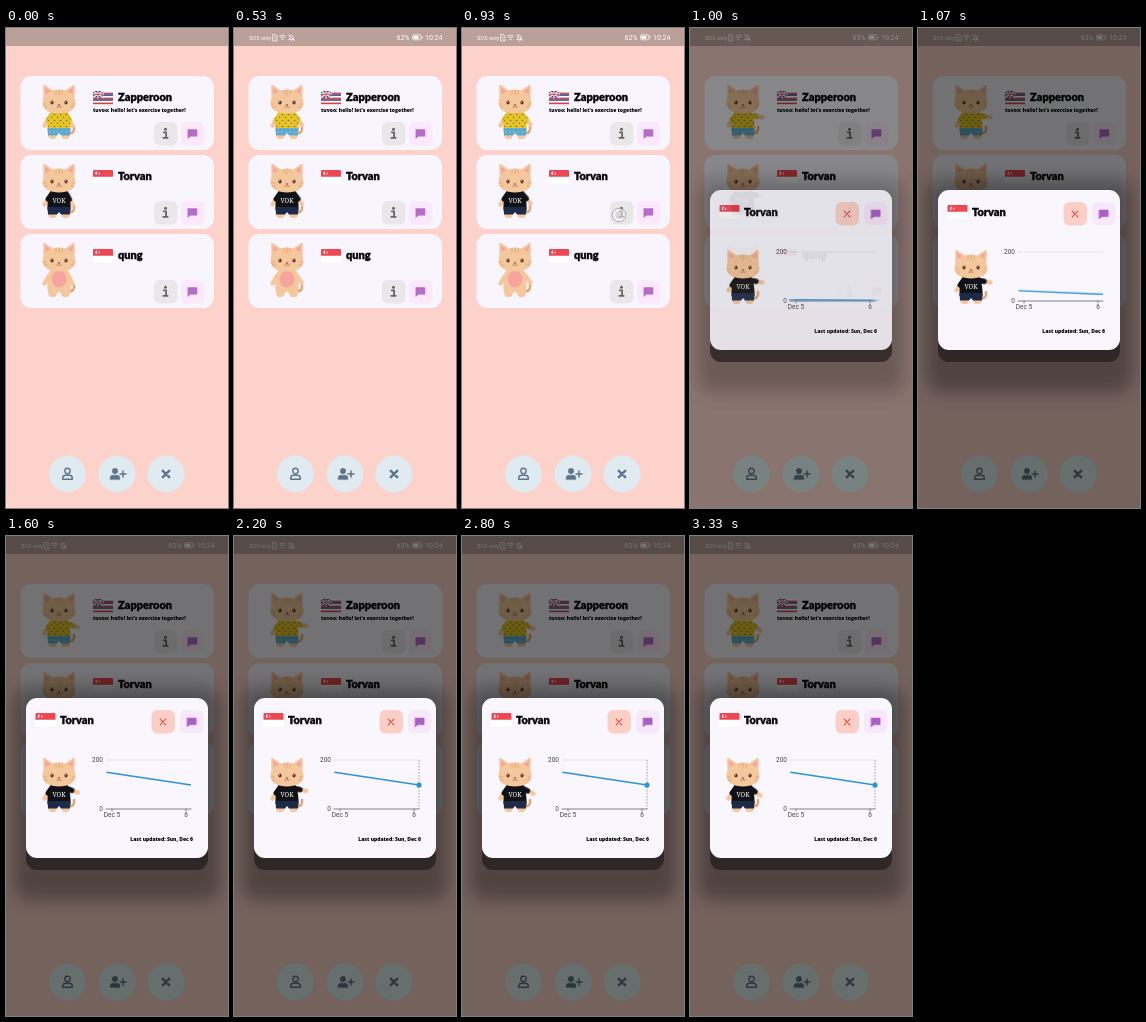
Recreate the animation shown at these times as an HTML page. Size 222x480 px, loop 3.39 s.

```html
<!DOCTYPE html>
<html lang="en">
<head>
<meta charset="utf-8">
<title>Friends</title>
<style>
html, body { margin: 0; width: 100%; height: 100%; overflow: hidden; background: #fdd2cb; }
svg { display: block; width: 100%; height: 100%; }
text { font-family: Roboto, sans-serif; }
.name { font: 900 11px Lato, sans-serif; stroke: #000; stroke-width: .35px; stroke-linejoin: round; }
.note { font: 800 5px 'Open Sans', sans-serif; }
.axis { font-size: 6.5px; fill: #444; }

.arm, .status, .low, .high, .touch, .dim, .modal, .line, .cursor { animation: 3390ms linear infinite; }
.arm { animation-name: wave; animation-timing-function: ease-in-out; }
.status { animation-name: status; animation-timing-function: step-end; }
.low { animation-name: low; animation-timing-function: step-end; }
.high { animation-name: high; animation-timing-function: step-end; }
.touch { animation-name: touch; animation-timing-function: step-end; }
.cursor { animation-name: cursor; animation-timing-function: step-end; }
.dim { animation-name: dim; }
.modal { animation-name: modal; }
.line { animation-name: grow; transform-origin: 0 273px; vector-effect: non-scaling-stroke; }

@keyframes wave {
  0% { transform: rotate(60deg); }
  27.4% { transform: rotate(48deg); }
  29.4%, 31.6% { transform: rotate(9deg); }
  47.2% { transform: rotate(20deg); }
  64.9% { transform: rotate(12deg); }
  98.2%, 100% { transform: rotate(36deg); }
}
@keyframes status { 0% { opacity: 0; } 2% { opacity: 1; } }
@keyframes low { 0% { opacity: 1; } 29% { opacity: 0; } }
@keyframes high { 0% { opacity: 0; } 29% { opacity: 1; } }
@keyframes touch { 0% { opacity: 0; } 25% { opacity: 1; } 29% { opacity: 0; } }
@keyframes cursor { 0% { opacity: 0; } 55% { opacity: 1; } }
@keyframes dim { 0%, 27.6% { opacity: 0; } 29.5% { opacity: .84; } 31.5%, 100% { opacity: 1; } }
@keyframes modal { 0%, 27.6% { opacity: 0; } 29.5% { opacity: .86; } 31.5%, 100% { opacity: 1; } }
@keyframes grow {
  0%, 29.2% { transform: scaleY(.02); animation-timing-function: cubic-bezier(.25, .1, .25, 1); }
  42%, 100% { transform: scaleY(1); }
}
</style>
</head>
<body>
<svg id="stage" viewBox="0 0 222 480" preserveAspectRatio="none"></svg>
<script>
const rect = (x, y, w, h, fill, r = 0, more = '') =>
  `<rect x="${x}" y="${y}" width="${w}" height="${h}" rx="${r}" fill="${fill}" ${more}/>`;
const oval = (x, y, rx, ry, fill) => `<ellipse cx="${x}" cy="${y}" rx="${rx}" ry="${ry}" fill="${fill}"/>`;
const path = (d, fill, stroke = 'none', w = 1) =>
  `<path d="${d}" fill="${fill}" stroke="${stroke}" stroke-width="${w}" stroke-linecap="round" stroke-linejoin="round"/>`;
const text = (x, y, cls, s, more = '') => `<text x="${x}" y="${y}" class="${cls}" ${more}>${s}</text>`;
const at = (x, y, s, more = '') => `<g transform="translate(${x} ${y})" ${more}>${s}</g>`;

const FUR = '#f5c79c', TAN = '#e0a878', PINK = '#f7a49f';
const outfits = {
  beach: { top: 'url(#print)', bottom: 'url(#waves)' },
  tee: { top: '#111217', bottom: '#1d2b47', label: 'VOK' },
  bare: { top: FUR, bottom: FUR }
};

// Origin is the centre of the head.
function cat(x, y, kind) {
  const { top, bottom, label } = outfits[kind];
  const limb = path('M0 0H12', 'none', FUR, 4.5) + path('M0 0H5.5', 'none', top, 5.5);
  const arm = (dx, flip, cls, turn) =>
    `<g transform="translate(${dx} 14.5) scale(${flip} 1)"><g class="${cls}" ${turn}>${limb}</g></g>`;
  const ear = side => `<g transform="scale(${side} 1)">` +
    path('M15.5 -1L15.8 -15Q15.5 -17 13.5 -15.5L4 -9Z', FUR) + path('M13.6 -7L14 -13.5L8.5 -9.5Z', PINK) + '</g>';
  return at(x, y,
    path('M9 32Q16 33 15 26', 'none', TAN, 2.6) +
    rect(-10.5, 28, 8, 10, FUR, 3) + rect(2.5, 28, 8, 10, FUR, 3) +
    arm(-7.5, -1, '', 'transform="rotate(55)"') + arm(7.5, 1, 'arm', '') +
    path('M-8 10H8Q12 19 11.5 30H-11.5Q-12 19 -8 10Z', top) +
    path('M-11.5 27H11.5L11 34.5H2L0 32L-2 34.5H-11Z', bottom) +
    (kind === 'bare' ? oval(0, 20, 7.5, 8.5, PINK) : '') +
    (label ? `<text y="22.5" text-anchor="middle" font-size="6.2" fill="#fff" style="font-family:'Noto Serif',serif">${label}</text>` : '') +
    ear(-1) + ear(1) +
    path('M0 -11.5C10 -11.5 16.5 -5 16.5 2C16.5 9 9 12.5 0 12.5S-16.5 9 -16.5 2C-16.5 -5 -10 -11.5 0 -11.5Z', FUR) +
    path('M-3 -10V-7M0 -11V-6M3 -10V-7M-15.5 3H-13M15.5 3H13M-14.5 6H-12M14.5 6H12', 'none', TAN, 1) +
    oval(-7, 1.5, 1.6, 1.9, '#5b3427') + oval(7, 1.5, 1.6, 1.9, '#5b3427') +
    oval(-7.4, .8, .5, .6, '#fff') + oval(6.6, .8, .5, .6, '#fff') +
    oval(0, 4, 1.3, .9, '#c9675f') +
    path('M-2.5 6Q-1 7.5 0 5.5Q1 7.5 2.5 6', 'none', '#8d5744', .6));
}

const redFlag = rect(0, 0, 20, 13.5, '#fff', 1) + path('M0 1Q0 0 1 0H19Q20 0 20 1V6.8H0Z', '#ee4652') +
  path('M4.5 1.7A1.7 1.7 0 1 0 4.5 5A2 2 0 0 1 4.5 1.7Z', '#fff') + oval(6.2, 3.4, .8, 1, '#fbd5d8');

const stripes = ['#fff', '#d8404b', '#37508f', '#fff', '#d8404b', '#37508f', '#fff', '#d8404b'];
const isleFlag = stripes.map((c, i) => rect(0, i * 1.65, 20, 1.65, c)).join('') +
  rect(0, 0, 10, 6.6, '#31478a') + path('M0 0L10 6.6M10 0L0 6.6', 'none', '#fff', 1.2) +
  path('M5 0V6.6M0 3.3H10', 'none', '#fff', 2) + path('M5 0V6.6M0 3.3H10', 'none', '#d8404b', 1);

const chat = c => path('M-4.5 -4H4.5V2.8H-1.8L-4.5 4.8Z', c, c, .5);
const info = path('M-1.7 -1.2H.6V4M-2.2 4.3H2.2', 'none', '#666', 1.8) + oval(0, -4.2, 1.5, 1.5, '#666');
const cross = (r, c, w) => path(`M${-r} ${-r}L${r} ${r}M${r} ${-r}L${-r} ${r}`, 'none', c, w);

function card(y, kind, flag, name, note = '') {
  return at(0, y,
    rect(14.5, 0, 193.5, 74, '#f8f5fe', 11) + cat(53, 25, kind) + at(87, 15, flag) +
    text(112, 25, 'name', name) + text(87, 36, 'note', note) +
    rect(148, 46, 23.5, 23.5, '#e9e7e9', 6) + at(159.5, 57.5, info) +
    rect(175, 46, 23.5, 23.5, '#fbe8fb', 6) + at(186.5, 57.5, chat('#b56cc6')));
}

const INK = '#5f7488';
const person = (fill, w) => `<circle cy="-3" r="2.7" fill="${fill}" stroke="${INK}" stroke-width="${w}"/>` +
  path('M-4.8 5.2V4Q-4.8 1.2 -2 1.2H2Q4.8 1.2 4.8 4V5.2Z', fill, INK, w);
const round = (x, icon) => at(x, 446, oval(0, 0, 18.5, 18.5, '#dfebf0') + icon);

const statusIcons =
  path('M39 6.5H41.5L43 8V13H39Z', 'none', '#fff', .7) + path('M41 8.5V10.3M41 11.4V11.5', 'none', '#fff', .7) +
  path('M45.5 8Q48.5 5.7 51.5 8M46.7 9.6Q48.5 8.3 50.3 9.6', 'none', '#fff', .8) + oval(48.5, 11.5, .8, .8, '#fff') +
  path('M55 11.5H60L59.2 10V8.3Q57.5 5.6 55.8 8.3V10ZM57 13H58M54.6 6.4L60.4 12.6', 'none', '#fff', .7);
const battery = rect(178.5, 6.8, 8.5, 5, 'none', 1, 'stroke="#fff" stroke-width=".7"') +
  rect(179.5, 7.8, 5, 3, '#fff') + rect(187.6, 8.2, .8, 2.2, '#fff');

const status = `<g class="status" fill="#fff">` +
  text(15, 11.8, '', 'SOS only', 'font-size="5.6"') + statusIcons +
  text(162.5, 12, 'low', '62%', 'font-size="7"') + text(162.5, 12, 'high', '63%', 'font-size="7"') +
  battery + text(191, 12, '', '10:24', 'font-size="7"') + '</g>';

const dim = `<g class="dim">` +
  rect(0, 0, 222, 480, '#000400', 0, 'opacity=".54"') +
  rect(8, 152, 206, 212, '#000', 14, 'opacity=".32" filter="url(#soft)"') + '</g>';

const chart =
  path('M100 224H185', 'none', '#dcdce2', .7) + path('M100 273H185M106 273V275M180 273V275', 'none', '#666', .8) +
  text(97, 226, 'axis', '200', 'text-anchor="end"') + text(97, 275, 'axis', '0', 'text-anchor="end"') +
  text(106, 281, 'axis', 'Dec 5', 'text-anchor="middle"') + text(180, 281, 'axis', '6', 'text-anchor="middle"') +
  `<path class="line" d="M100.5 236.3L185 249" fill="none" stroke="#2b93d9" stroke-width="1.4"/>` +
  `<g class="cursor"><path d="M185 224V273" stroke="#777" stroke-width=".7" stroke-dasharray="1.5 1.5"/>` +
  oval(185, 249, 2.6, 2.6, '#2b93d9') + '</g>';

const modal = `<g class="modal">` + rect(20, 176, 182, 158, '#2f2725', 11) + rect(20, 162, 182, 160, '#f9f6fe', 11) +
  at(29.5, 177, redFlag) + text(54, 188, 'name', 'Torvan') +
  rect(145.5, 174, 23.5, 23.5, '#fccfc6', 6) + at(157, 186, cross(2.8, '#e2483f', 1.1)) +
  rect(174, 174, 23.5, 23.5, '#f8e8fb', 6) + at(185.7, 186, chat('#a85fc6')) +
  cat(53, 238, 'tee') + chart +
  text(187, 305, 'note', 'Last updated: Sun, Dec 6', 'text-anchor="end"') + '</g>';

document.getElementById('stage').innerHTML = `<defs>
  <filter id="soft" x="-20%" y="-20%" width="140%" height="140%"><feGaussianBlur stdDeviation="9"/></filter>
  <pattern id="print" width="6" height="6" patternUnits="userSpaceOnUse">
    ${rect(0, 0, 6, 6, '#e6c529') + oval(1.5, 1.5, 1, .8, '#8a7a24') + oval(4.5, 4.3, .8, 1, '#b08b1e')}
  </pattern>
  <pattern id="waves" width="4" height="4" patternUnits="userSpaceOnUse">
    ${rect(0, 0, 4, 4, '#54add4') + oval(1, 1, .8, .6, '#d7785c') + oval(3, 3, .7, .6, '#a7dcec')}
  </pattern></defs>` +
  rect(0, 0, 222, 480, '#fdd2cb') + rect(0, 0, 222, 18, '#bb9f99') +
  card(48, 'beach', isleFlag, 'Zapperoon', "tuvoo: hello! let's exercise together!") +
  card(127, 'tee', redFlag, 'Torvan') +
  card(206, 'bare', redFlag, 'qung') +
  round(61.5, person('none', 1.4)) +
  round(111, at(-2, 0, person(INK, .6)) + path('M6 -3V3M3 0H9', 'none', INK, 1.5)) +
  round(160, cross(3.2, INK, 2.4)) +
  `<g class="touch"><circle cx="157" cy="187" r="6.8" fill="#fff" fill-opacity=".55" stroke="#9a9aa0" stroke-width=".8"/>` +
  `<circle cx="157" cy="187" r="3.8" fill="#bbb" fill-opacity=".5"/></g>` +
  status + dim + modal;
</script>
</body>
</html>
```
